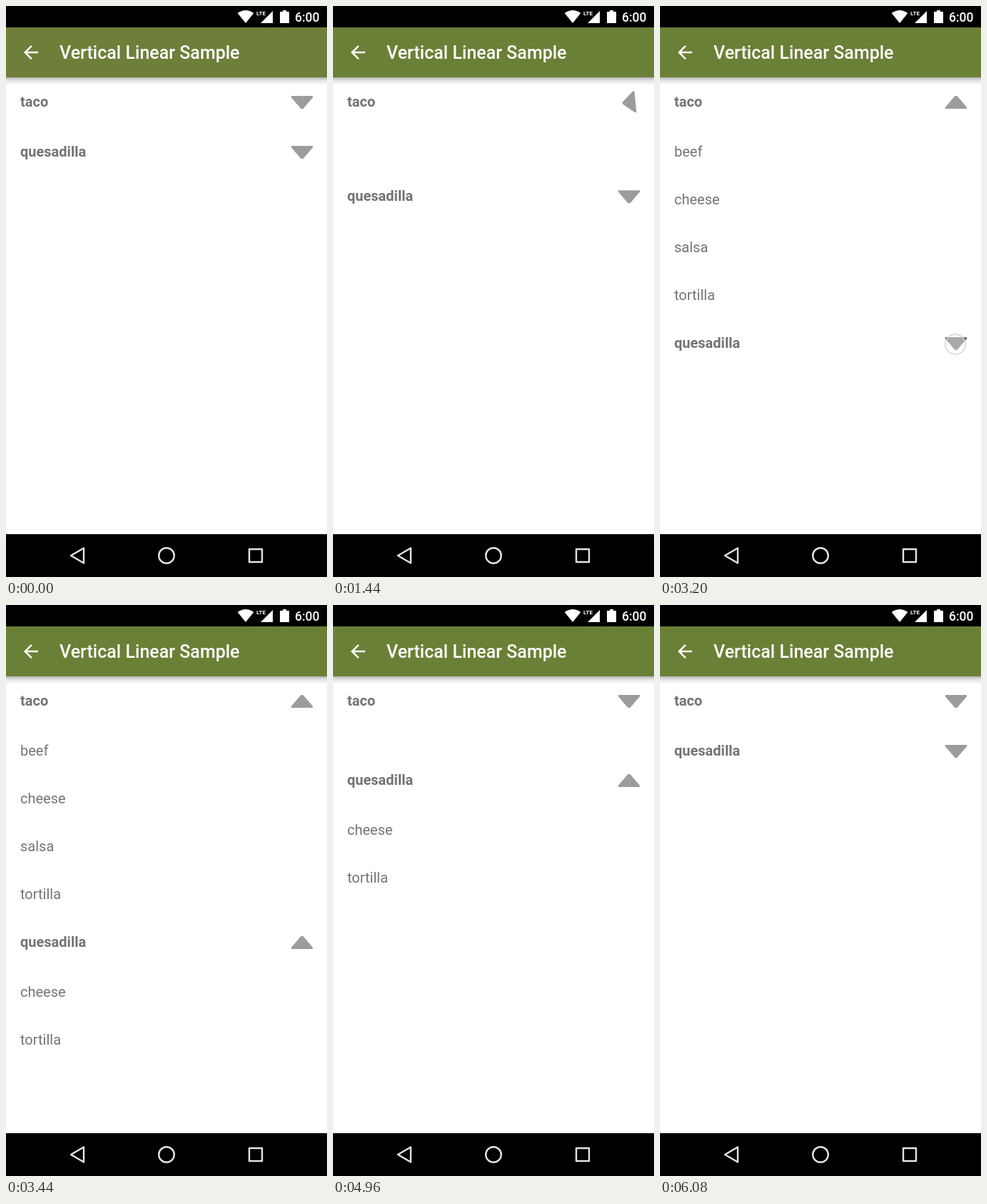
Recreate the animation shown at these times as an HTML page with a canvas. Size 450 by 800 pixels, loop 8320 ms.

```html
<!DOCTYPE html>
<html lang="en">
<head>
<meta charset="utf-8">
<title>Vertical Linear Sample</title>
<style>
  html, body { margin: 0; width: 100%; height: 100%; overflow: hidden; background: #fff; }
  canvas { display: block; width: 450px; height: 800px; }
</style>
</head>
<body>
<canvas id="stage" width="450" height="800"></canvas>
<script>
const ctx = document.getElementById('stage').getContext('2d');
const LOOP = 8320, STEP = 80;
const ROTATE = 200, MOVE = 250, FADE = 120;
const TACO_Y = 135, FIRST_CHILD = 70, CHILD_ROW = 67;
const TACO_ITEMS = ['beef', 'cheese', 'salsa', 'tortilla'];
const QUESADILLA_ITEMS = ['cheese', 'tortilla'];
const TOUCHES = [
  { at: 1280, x: 414, y: 137 },
  { at: 3200, x: 414, y: 474 },
  { at: 4640, x: 412.5, y: 142 },
  { at: 5840, x: 416.5, y: 200 }
];

// Accelerate-decelerate progress, clamped to 0..1.
function ease(t, start, duration) {
  const p = Math.min(1, Math.max(0, (t - start) / duration));
  return (1 - Math.cos(Math.PI * p)) / 2;
}

// Rises to 1 after `open` and falls back to 0 after `close`.
function toggle(t, open, close, duration) {
  return ease(t, open, duration) - ease(t, close, duration);
}

function text(str, x, y, size, weight, color) {
  ctx.font = `${weight} ${size}px Roboto, sans-serif`;
  ctx.fillStyle = color;
  ctx.fillText(str, x, y);
}

function polygon(points) {
  ctx.beginPath();
  points.forEach(([x, y]) => ctx.lineTo(x, y));
  ctx.closePath();
}

function fillPath(d, color) {
  ctx.fillStyle = color;
  ctx.fill(new Path2D(d));
}

function drawStatusBar() {
  ctx.fillStyle = '#000';
  ctx.fillRect(0, 0, 450, 30);
  fillPath('M336 24 L324.7 10 Q336 2 347.3 10 Z', '#fff');
  fillPath('M374 7 V24 H357 Z', '#fff');
  ctx.fillStyle = '#000';
  ctx.fillRect(351, 5, 14, 9);
  text('LTE', 351, 13, 8, 700, '#fff');
  fillPath('M388 6 H393 V8 H397 V24 H384 V8 H388 Z', '#fff');
  text('6:00', 405, 22, 17.5, 500, '#fff');
}

function drawToolbar(t) {
  const shadow = ctx.createLinearGradient(0, 100, 0, 111);
  shadow.addColorStop(0, 'rgba(0,0,0,.29)');
  shadow.addColorStop(0.4, 'rgba(0,0,0,.11)');
  shadow.addColorStop(1, 'rgba(0,0,0,0)');
  ctx.fillStyle = shadow;
  ctx.fillRect(0, 100, 450, 11);

  ctx.fillStyle = t < 1280 ? '#6e7f3a' : '#6a8036';
  ctx.fillRect(0, 30, 450, 70);
  ctx.save();
  ctx.translate(20, 50);
  ctx.scale(1.25, 1.25);
  fillPath('M20 11H7.83l5.59-5.59L12 4l-8 8 8 8 1.41-1.41L7.83 13H20z', '#fff');
  ctx.restore();
  text('Vertical Linear Sample', 75, 74, 25, 500, '#fff');
}

function drawNavBar() {
  ctx.fillStyle = '#000';
  ctx.fillRect(0, 740, 450, 60);
  ctx.strokeStyle = '#e4e4e4';
  ctx.lineWidth = 2.4;
  ctx.lineJoin = 'round';
  polygon([[91, 770], [109, 759.5], [109, 780.5]]);
  ctx.stroke();
  ctx.beginPath();
  ctx.arc(225, 770, 10.8, 0, Math.PI * 2);
  ctx.stroke();
  ctx.strokeRect(341, 761, 18, 18);
}

function drawHeader(label, y, turn, pressed) {
  text(label, 20, Math.round(y + 6), 20, 700, '#737373');
  ctx.save();
  ctx.translate(415, y);
  ctx.rotate(turn * Math.PI);
  polygon([[-15, -9], [15, -9], [15, -6.8], [1.5, 9], [-1.5, 9], [-15, -6.8]]);
  ctx.fillStyle = pressed ? '#6c6c6c' : '#9c9b9d';
  ctx.fill();
  ctx.restore();
}

function drawItems(items, headerY, alpha) {
  if (alpha <= 0) return;
  ctx.globalAlpha = alpha;
  items.forEach((label, i) => {
    const y = headerY + FIRST_CHILD + i * CHILD_ROW;
    text(label, 20, Math.round(y + 6), 20, 400, '#757575');
  });
  ctx.globalAlpha = 1;
}

function drawTouch({ x, y }) {
  ctx.beginPath();
  ctx.arc(x, y, 14, 0, Math.PI * 2);
  ctx.fillStyle = 'rgba(255,255,255,.42)';
  ctx.fill();
  ctx.strokeStyle = 'rgba(214,208,234,.85)';
  ctx.lineWidth = 2;
  ctx.stroke();
}

function draw(t) {
  ctx.fillStyle = '#fff';
  ctx.fillRect(0, 0, 450, 800);

  const touch = TOUCHES.find(p => p.at === t);
  const shift = TACO_ITEMS.length * CHILD_ROW * toggle(t, 1360, 4774, MOVE);
  const quesadillaY = TACO_Y + FIRST_CHILD + shift;
  const isPressed = y => Boolean(touch) && Math.abs(touch.y - y) < 20;

  drawItems(TACO_ITEMS, TACO_Y, toggle(t, 1610, 4654, FADE));
  drawItems(QUESADILLA_ITEMS, quesadillaY, toggle(t, 3220, 5860, FADE));
  drawHeader('taco', TACO_Y, toggle(t, 1344, 4654, ROTATE), isPressed(TACO_Y));
  drawHeader('quesadilla', quesadillaY, toggle(t, 3220, 5860, ROTATE), isPressed(quesadillaY));
  if (touch) drawTouch(touch);

  drawToolbar(t);
  drawStatusBar();
  drawNavBar();
}

const start = performance.now();
function tick() {
  const elapsed = Math.max(0, performance.now() - start) % LOOP;
  draw(Math.floor(elapsed / STEP) * STEP);
  requestAnimationFrame(tick);
}
tick();
</script>
</body>
</html>
```
